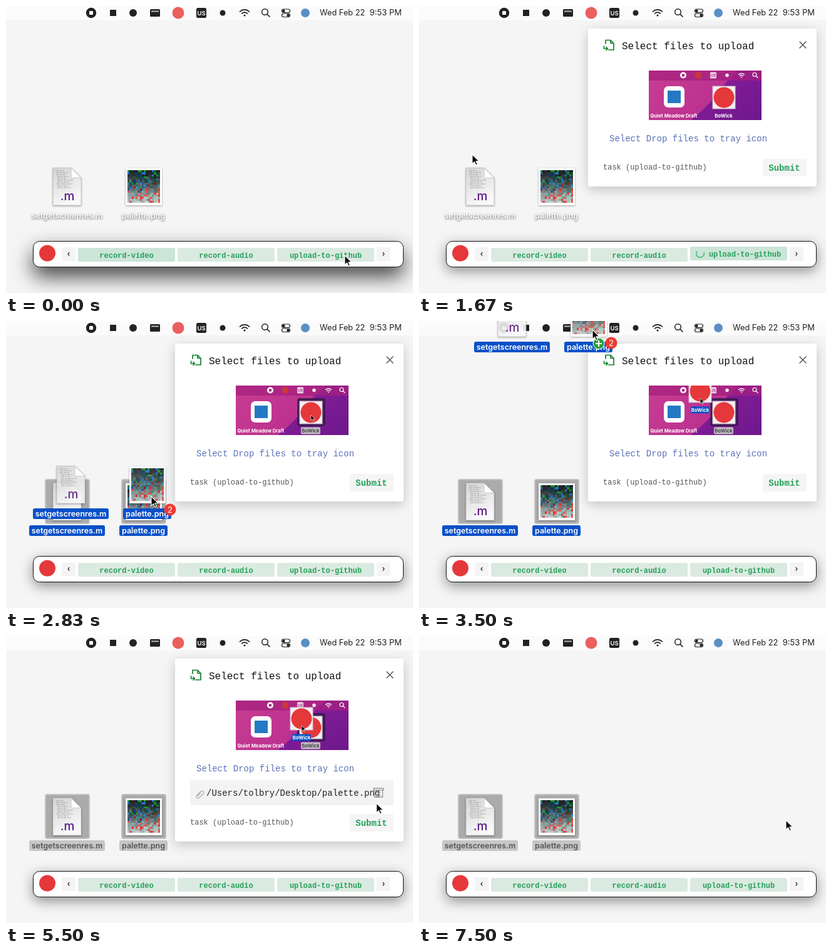
These frames come from a looping animation (650x458 px, 7670 ms). An HTML page:

```html
<!DOCTYPE html>
<html lang="en">
<head>
<meta charset="utf-8">
<title>Upload files from the tray</title>
<style>
html, body { margin: 0; width: 100%; height: 100%; overflow: hidden; background: #f5f5f5 }
svg { display: block; width: 650px; height: 458px }
text { font-family: Inter, sans-serif; white-space: pre }
.mid { text-anchor: middle }
.mono { font-family: "Liberation Mono", monospace }
.path { font-size: 14px; fill: #222 }
.line { fill: none; stroke-linecap: round; stroke-linejoin: round }
.label text { font-size: 12.5px; font-weight: 600; text-anchor: middle; fill: #fff; filter: drop-shadow(0 1px 1.5px rgba(0,0,0,.65)) }
.label rect { fill: none }
.label.on rect { fill: #0a50c8 }
.label.off rect { fill: #c6c6c6 }
.label.on text, .label.off text { filter: none }
.label.off text { fill: #555 }
.task { font-size: 12px; font-weight: 700; fill: #26a05a; text-anchor: middle }
.tiny { font-size: 7.7px; font-weight: 700; fill: #fff; text-anchor: middle }
#icons { filter: drop-shadow(0 1px 1.5px rgba(0,0,0,.35)) }
#barBox { filter: drop-shadow(0 6px 10px rgba(0,0,0,.42)) }
#barBox.active { filter: drop-shadow(0 15px 16px rgba(0,0,0,.72)) }
#dialogBox { filter: drop-shadow(0 5px 9px rgba(0,0,0,.2)) }
</style>
</head>
<body>
<svg viewBox="0 0 650 458">
  <defs>
    <path id="arrow" d="M0 0V15L3.6 11.6 6 17 8.4 16 6 10.8H11Z" fill="#000" stroke="#fff" stroke-width="1.1"/>
    <path id="hand" d="M-2.500.5a1.500 1.500 0 0 1 3 0V6q1.500-1 2.700.3 1.500-.6 2.600.5 2.200-.3 2.200 1.700 0 4-1.500 7.500H0Q-4 11-6 8.500-5 6.500-2.500 8.500Z" fill="#fff" stroke="#000" stroke-width="1.200"/>
    <g id="plus">
      <circle r="9" fill="#2f9e3c" stroke="#fff"/>
      <path d="M-5 0H5M0-5V5" stroke="#fff" stroke-width="2"/>
    </g>
    <g id="clip" class="line" stroke="#aaa" stroke-width="1.1">
      <path d="M-5 3 2-4a2.8 2.8 0 0 1 4 4L-1 6.500a1.800 1.800 0 0 1-3-2.500L2-1.500"/>
    </g>
    <g id="app">
      <rect x="-18" y="-18" width="36" height="36" fill="#f4eef2" stroke="#cdb9c8"/>
      <circle r="16.500" fill="#e5383b"/>
    </g>
    <linearGradient id="pink" x2="1" y2=".4">
      <stop stop-color="#c93c91"/><stop offset="1" stop-color="#b52d8e"/>
    </linearGradient>
    <linearGradient id="violet" x2="1" y2="1">
      <stop stop-color="#8d1f9c"/><stop offset="1" stop-color="#6d188c"/>
    </linearGradient>
    <linearGradient id="paper" x2=".4" y2="1">
      <stop stop-color="#d4d4d4"/><stop offset="1" stop-color="#f8f8f8"/>
    </linearGradient>
    <clipPath id="thumbClip"><rect x="367" y="103" width="180" height="79"/></clipPath>
  </defs>

  <rect width="650" height="458" fill="#f5f5f5"/>

  <g id="menu" fill="#222">
    <rect width="650" height="23" fill="#fbfbfb"/>
    <circle cx="136" cy="11" r="8.200"/>
    <rect x="133" y="8" width="6" height="6" rx="1" fill="#fff"/>
    <rect x="166" y="6" width="10" height="10"/>
    <circle cx="203" cy="11" r="6"/>
    <rect x="230" y="5" width="16" height="12" rx="1.500"/>
    <path d="M232.500 8.500h11" stroke="#fff" stroke-width="2" stroke-dasharray="2 1"/>
    <circle cx="275" cy="11" r="9.500" fill="#ea5f5f"/>
    <rect x="304" y="3" width="16" height="16" rx="2.500"/>
    <text class="mid" x="312" y="14.500" font-size="9.500" font-weight="600" fill="#fff">US</text>
    <circle cx="346" cy="11" r="4.500"/>
    <g class="line" stroke="#222" stroke-width="1.700">
      <path d="M373.500 9a10.500 10.500 0 0 1 15 0M376.500 12a6.300 6.300 0 0 1 9 0"/>
      <circle cx="413.500" cy="9.500" r="4.800" stroke-width="1.500"/><path d="m417 13 4 4"/>
      <g stroke-width="1.200">
        <rect x="440.500" y="5" width="13" height="5.500" rx="2.700"/>
        <rect x="440.500" y="12" width="13" height="5.500" rx="2.700"/>
      </g>
    </g>
    <circle cx="443.500" cy="7.700" r="2.200"/><circle cx="450.500" cy="14.700" r="2.200"/>
    <circle cx="381" cy="15" r="1.500"/>
    <circle cx="478" cy="11" r="7" fill="#5a8fc4"/>
    <text x="501" y="15" font-size="12.800">Wed Feb 22</text>
    <text x="632" y="15" font-size="13" text-anchor="end">9:53 PM</text>
  </g>

  <g fill="#ababab" stroke="#c2c2c2" stroke-width="2">
    <rect id="docBox" x="63" y="253" width="70" height="70" rx="3"/>
    <rect id="palBox" x="185" y="253" width="70" height="70" rx="3"/>
  </g>
  <g id="icons">
    <path d="M75 258.500h29l16 16V318H75Z" fill="url(#paper)" stroke="#b5b5b5" stroke-width=".6"/>
    <path d="M104 258.500v16h16Z" fill="#fff" stroke="#bbb" stroke-width=".8"/>
    <path d="M80 263h12m-12 3h19m-19 3h15m-13 3h18m-18 3h14m-14 3h25m-25 3h20m-22 3h27m-25 3h18m-18 3h22" stroke="#999" stroke-width=".9" stroke-dasharray="5 1 3 1"/>
    <text class="mid" x="98" y="310" font-size="19" font-weight="500" fill="#5b1a86">.m</text>
    <rect x="191" y="259" width="58" height="59" fill="#fff"/>
    <g id="mosaic" shape-rendering="crispEdges"></g>
  </g>
  <g id="names">
    <g class="label"><rect x="37" y="326" width="121" height="17" rx="3"/><text x="97.500" y="339">setgetscreenres.m</text></g>
    <g class="label"><rect x="181" y="326" width="77" height="17" rx="3"/><text x="219.500" y="339">palette.png</text></g>
  </g>
  <rect id="marquee" x="85.500" y="237.500" fill="#fff" fill-opacity=".1" stroke="#fff" stroke-opacity=".65"/>

  <g id="dialog">
    <rect id="dialogBox" x="270" y="36" width="365" rx="3" fill="#fff"/>
    <g class="line" stroke="#12812c" stroke-width="1.700">
      <path d="M298 60v-5.500h8l5 5V70h-8M306 54.500v5h5M295.500 64v4h6m-2.500-2.500 2.500 2.500-2.500 2.500"/>
      <path d="m608 57 10 10m0-10-10 10" stroke="#555" stroke-width="1.500"/>
    </g>
    <text class="mono" x="324" y="69" font-size="16" fill="#111">Select files to upload</text>
    <g clip-path="url(#thumbClip)">
      <rect x="367" y="103" width="180" height="79" fill="url(#pink)"/>
      <path d="M547 103V182H434Q462 160 476 140T510 103Z" fill="url(#violet)"/>
      <rect x="367" y="103" width="180" height="16" fill="#a5207f" fill-opacity=".75"/>
      <g fill="#fff">
        <circle cx="422" cy="110.500" r="5"/><rect x="420" y="108.500" width="4" height="4" fill="#a5207f"/>
        <circle cx="446" cy="110.500" r="5.500" fill="#c8383f"/>
        <rect x="465" y="105.500" width="10" height="10" rx="1.500" fill="#f0d5e8"/>
        <text class="mid" x="470" y="113" font-size="6" font-weight="600" fill="#a5207f">US</text>
        <circle cx="492" cy="110.500" r="2.700"/>
        <circle cx="515" cy="113.500" r="1"/>
        <rect x="391" y="128" width="33" height="34" rx="7"/>
        <rect x="397" y="135" width="21" height="20" fill="#2479c4"/>
      </g>
      <g class="line" stroke="#fff" stroke-width="1.200">
        <path d="M510.500 109.500a6.300 6.300 0 0 1 9 0M512.500 111.500a3.600 3.600 0 0 1 5 0"/>
        <circle cx="536" cy="109.500" r="3"/><path d="m538.500 112 2.500 2.500"/>
      </g>
      <text class="tiny" x="407" y="178">Quiet Meadow Draft</text>
      <rect id="appBox" x="466" y="124" width="43" height="43" rx="2" fill="#45205c" stroke="#221030"/>
      <use href="#app" x="487" y="146"/>
      <rect id="appPill" x="471" y="169.500" width="31" height="11" rx="2" fill="#c4c0c6"/>
      <text class="tiny" id="appName" x="486.500" y="178">BoWick</text>
      <g id="appGhost">
        <use href="#app" y="-11"/>
        <rect x="-15" y="13.500" width="30" height="11" rx="2" fill="#0a50c8"/>
        <text class="tiny" y="22">BoWick</text>
        <use id="appPlus" href="#plus" transform="translate(5 12) scale(.62)"/>
      </g>
      <use id="appCursor" href="#arrow"/>
    </g>
    <text class="mono" x="304" y="216" font-size="14" fill="#5a72b8">Select Drop files to tray icon</text>
    <g id="twoFiles">
      <rect x="294" y="230" width="325" height="56" rx="2" fill="#f0f0f0"/>
      <use href="#clip" x="309" y="252"/><use href="#clip" x="309" y="308"/>
      <text class="mono path" x="320" y="252">/Users/tolbry/Desktop/setgetscreen</text>
      <text class="mono path" x="320" y="275">res.m</text>
      <text class="mono path" x="320" y="312">/Users/tolbry/Desktop/palette.png</text>
    </g>
    <g id="oneFile">
      <rect x="294" y="230" width="325" height="40" rx="2" fill="#f3f3f3"/>
      <use href="#clip" x="309" y="252"/>
      <text class="mono path" x="320" y="255">/Users/tolbry/Desktop/palette.png</text>
    </g>
    <path id="trash" class="line" stroke-width="1.300" d="M-8-7H8V-4H-8ZM-6.500-4V7H6.500V-4M-2.500-1l5 5m0-5-5 5"/>
    <g id="footer">
      <text class="mono" x="294" y="261" font-size="12" fill="#555">task (upload-to-github)</text>
      <rect x="549" y="244" width="70" height="28" rx="2" fill="#f5f5f5"/>
      <text class="mono mid" x="583.500" y="263" font-size="14" font-weight="700" fill="#26a05a">Submit</text>
    </g>
  </g>

  <g id="bar">
    <rect id="barBox" x="43.500" y="375.500" width="591" height="41" rx="10" fill="#fff" stroke="#111"/>
    <circle cx="66" cy="394.500" r="13" fill="#e5383b"/>
    <g fill="#f4f4f4"><rect x="89" y="385" width="22" height="22" rx="2"/><rect x="592" y="385" width="22" height="22" rx="2"/></g>
    <path class="line" stroke="#222" stroke-width="1.200" d="m101 393.500-2 2.300 2 2.300M602 393.500l2 2.300-2 2.300"/>
    <g id="tasks"></g>
    <path id="spinner" class="line" stroke="#62bd88" stroke-width="1.800" d="M0-6.300A6.300 6.300 0 1 0 4.500 4.500"/>
  </g>

  <g id="ghost">
    <use href="#icons" opacity=".9"/>
    <use href="#names"/>
    <use id="dropPlus" href="#plus" x="236" y="329"/>
    <circle cx="256" cy="328" r="9.500" fill="#ee3b34"/>
    <text class="mid" x="256" y="333" font-size="13" fill="#fff">2</text>
  </g>
  <use id="cursor"/>
</svg>
<script>
const LOOP = 7670, STEPS = 46;
const $ = id => document.getElementById(id);
const show = (id, on) => $(id).style.display = on ? '' : 'none';
const move = (id, x, y, more = '') => $(id).setAttribute('transform', `translate(${x} ${y}) ${more}`);
const within = (v, from, to) => v >= from && v < to;

// Points are [time, x, y]; positions between them are linear.
function along(points, t) {
  const i = points.findIndex(p => p[0] > t);
  if (i < 0) return points.at(-1).slice(1);
  if (!i) return points[0].slice(1);
  const [a, b] = [points[i - 1], points[i]];
  const f = (t - a[0]) / (b[0] - a[0]);
  return [1, 2].map(c => a[c] + (b[c] - a[c]) * f);
}

// Pixel mosaic: greys from dark to pale with coloured accents.
const accents = [
  ['#1e6fc0', '#1d8a3a', '#123a60', '#0d5030'],
  ['#2e8fc0', '#8f1f24', '#2f8f5a', '#2a5a90'],
  ['#d93a34', '#9fc8b8', '#e05a50', '#8ab0a0']
];
let seed = 97;
const random = () => (seed = seed * 16807 % 2147483647) / 2147483647;
const size = 3.25;
for (let i = 0; i < 256; i++) {
  const row = i >> 4, shade = row + random() * 3;
  const light = 7 + 76 * (shade / 18) ** 1.5 + random() * 8;
  const band = accents[shade < 7 ? 0 : shade < 11 ? 1 : 2];
  const color = random() < .3 ? band[Math.floor(random() * 4)] : `hsl(190 9% ${light}%)`;
  $('mosaic').innerHTML += `<rect x="${194 + i % 16 * size}" y="${262 + row * size}" width="3.5" height="3.5" fill="${color}"/>`;
}

$('tasks').innerHTML = ['record-video', 'record-audio', 'upload-to-github'].map((name, i) =>
  `<g><rect x="${115 + 159 * i}" y="386" width="155" height="22" rx="2"/>
   <text class="mono task" x="${192.5 + 159 * i}" y="401.5">${name}</text></g>`).join('');
const tasks = [...$('tasks').children];
const labels = document.querySelectorAll('.label');

const pointer = [
  [1, 541, 398], [5, 535, 396], [6, 470, 360], [9, 85, 237], [10, 85, 237],
  [13, 229, 320], [14, 229, 321], [15, 226, 307], [16, 226, 307], [17, 232, 280],
  [19, 255, 150], [20, 270, 55], [21, 277, 14], [24, 277, 14], [28, 573, 237],
  [30, 593, 256], [32, 594, 256], [35, 587, 289], [36, 587, 289], [38, 586, 294]
];
const demoPointer = [
  [0, 457, 136], [1.5, 449, 123], [2, 447, 115], [3, 446, 111], [8.2, 487, 182],
  [8.5, 487, 173], [10.5, 487, 150], [12.5, 487, 150], [14.5, 457, 136]
];

function drawDemo(step) {
  const u = (step - 5 + 14.5) % 14.5;
  const [x, y] = along(demoPointer, u);
  const dragging = u < 3 || u > 12.5, selected = u < 3 || u > 11;
  show('appBox', selected);
  show('appPill', selected);
  $('appName').style.fill = selected ? '#444' : '#fff';
  show('appGhost', dragging);
  show('appPlus', within(u, 1.8, 3));
  show('appCursor', u < 3 || u > 8.2);
  move('appGhost', x, y);
  move('appCursor', x, y, 'scale(.58)');
}

function drawDialog(step) {
  const open = within(step, 4, 38);
  show('dialog', open);
  if (!open) return;
  const files = step < 24 ? 0 : step < 32 ? 2 : 1;
  const extra = [0, 40, 97][files];
  $('dialogBox').setAttribute('height', 252 + extra);
  move('footer', 0, extra);
  show('twoFiles', files === 2);
  show('oneFile', files === 1);
  show('trash', files === 1 || files && step >= 28);
  move('trash', 595, files === 2 ? 258 : 250);
  $('trash').setAttribute('stroke', files === 2 ? '#333' : '#999');
  drawDemo(step);
}

function drawBar(step) {
  const busy = within(step, 1, 12) || within(step, 38, 41);
  const lift = within(step, 1, 12) ? -2 : 0;
  const focus = step < 1 ? 0 : step < 15 ? 2 : -1;
  $('barBox').classList.toggle('active', step < 9);
  tasks.forEach((task, i) => task.setAttribute('fill', i === focus ? '#cbe5d8' : '#dbeae1'));
  tasks[2].setAttribute('transform', `translate(0 ${lift})`);
  tasks[2].lastElementChild.setAttribute('x', busy ? 520.5 : 510.5);
  show('spinner', busy);
  move('spinner', 449, 397 + lift, `rotate(${(step - 5) * 60})`);
}

function drawFiles(step, x, y) {
  const picked = [step >= 11, step >= 12];
  show('docBox', picked[0]);
  show('palBox', picked[1]);
  labels.forEach((label, i) =>
    label.setAttribute('class', 'label ' + (!picked[i] ? '' : step < 31 ? 'on' : 'off')));
  show('marquee', within(step, 10, 15));
  $('marquee').setAttribute('width', Math.max(0, x - 86));
  $('marquee').setAttribute('height', Math.max(0, y - 237));
  show('ghost', within(step, 16, 23));
  show('dropPlus', within(step, 20, 23));
  move('ghost', x - 226, y - 307);
}

function draw(now) {
  const step = Math.min(STEPS - 1, Math.floor((now % LOOP + 5) / (LOOP / STEPS)));
  const [x, y] = along(pointer, step);
  drawFiles(step, x, y);
  drawDialog(step);
  drawBar(step);
  $('cursor').setAttribute('href', within(step, 35, 38) ? '#hand' : '#arrow');
  move('cursor', x, y);
}

const start = performance.now();
(function tick() {
  draw(performance.now() - start);
  requestAnimationFrame(tick);
})();
</script>
</body>
</html>
```
